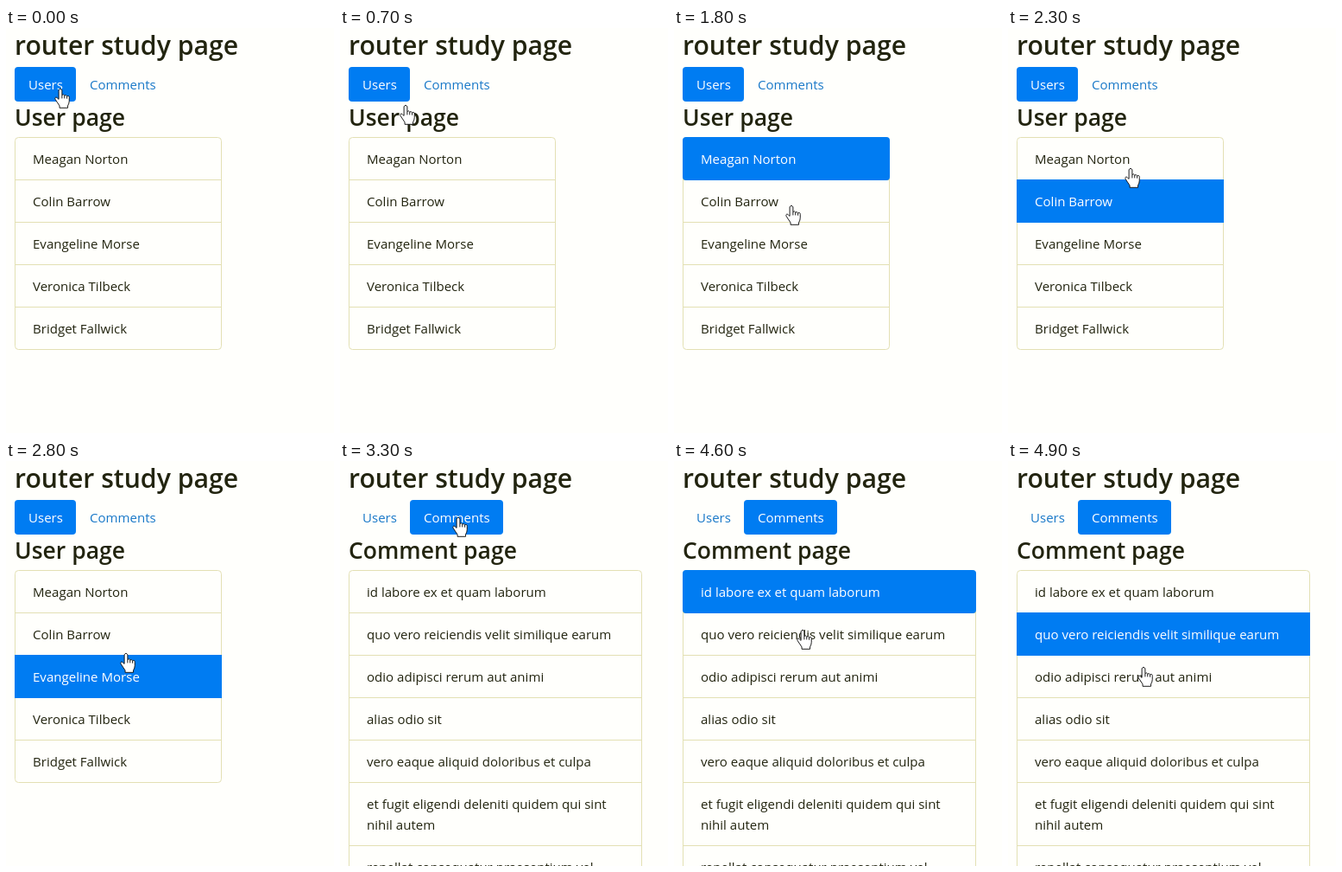
Write an HTML page that moves like this. It is 380 px wide and 468 px high and loops after 5 s.

```html
<!DOCTYPE html>
<html lang="en">
<head>
<meta charset="utf-8">
<title>router study page</title>
<style>
  html, body { margin: 0; width: 100%; height: 100%; overflow: hidden; background: #fffffc; }
  svg { display: block; font: 15.05px "Open Sans", "Noto Sans", sans-serif; fill: #22240f; }
  .title { font-size: 30.2px; font-weight: 600; }
  .sub { font-size: 26.5px; font-weight: 600; }
  .link { fill: #1878c8; }
  .on { fill: #fff; }
  .blue { fill: #007cf2; }
  .line { fill: none; stroke: #e3e0b4; }
  .hand { fill: #fff; stroke: #111; stroke-linejoin: round; }
</style>
</head>
<body>
<svg width="380" height="468" viewBox="0 0 380 468">
  <g id="page"></g>
  <g id="cursor" class="hand">
    <path d="M-2 13V2Q0-1.5 2 2V8Q3.5 6 5 8.5Q6.5 7 8 9.3Q10.8 8 10.8 11V15Q10.8 18 9 21V23.5H-1V21L-6 13.5C-7.5 11-5 9.5-3.6 11.8Z"/>
    <path fill="none" d="M2 8v4M5 8.5v3.5M8 9.3v3"/>
  </g>
</svg>
<script>
const LOOP = 5000, STEP = 100, ROW = 49, LINE = 24;
const pages = [
  { title: "User page", width: 240, items: [
    "Meagan Norton", "Colin Barrow", "Evangeline Morse", "Veronica Tilbeck", "Bridget Fallwick"] },
  { title: "Comment page", width: 340, items: [
    "id labore ex et quam laborum",
    "quo vero reiciendis velit similique earum",
    "odio adipisci rerum aut animi",
    "alias odio sit",
    "vero eaque aliquid doloribus et culpa",
    "et fugit eligendi deleniti quidem qui sint|nihil autem",
    "repellat consequatur praesentium vel|minus molestias voluptatum"] }
];
const tabs = [{ name: "Users", x: 10, w: 71 }, { name: "Comments", x: 81, w: 108 }];

// The hand rests at each stop from `at` until `leave`, then clicks and moves on.
const stops = [
  { at: 0, leave: 400, x: 63, y: 70, click: { page: 0 } },
  { at: 1400, leave: 1500, x: 121, y: 160, click: { page: 0, item: 0 } },
  { at: 1800, leave: 1900, x: 136, y: 205, click: { page: 0, item: 1 } },
  { at: 2300, leave: 2300, x: 142, y: 162 },
  { at: 2700, leave: 2710, x: 139, y: 247, click: { page: 0, item: 2 } },
  { at: 3100, leave: 3300, x: 137, y: 65, click: { page: 1 } },
  { at: 3300, leave: 3700, x: 137, y: 65 },
  { at: 4100, leave: 4400, x: 142, y: 152, click: { page: 1, item: 0 } },
  { at: 4600, leave: 4800, x: 149, y: 195, click: { page: 1, item: 1 } },
  { at: 4900, leave: LOOP, x: 157, y: 238 }
];

const text = (s, x, y, cls = "") => `<text x="${x}" y="${y}" class="${cls}">${s}</text>`;
const box = (x, y, w, h, cls, r = 0) =>
  `<rect x="${x}" y="${y}" width="${w}" height="${h}" rx="${r}" class="${cls}"/>`;

function drawPage({ page, item }) {
  const { title, width, items } = pages[page];
  let out = text("router study page", 10, 31, "title") + text(title, 10, 113, "sub");
  tabs.forEach(({ name, x, w }, i) => {
    if (i === page) out += box(x, 45, w, 40, "blue", 4);
    out += text(name, x + 16, 71, i === page ? "on" : "link");
  });

  let y = 126, active = "", rules = "", labels = "";
  items.forEach((label, i) => {
    const lines = label.split("|"), on = i === item;
    if (i) rules += `<path class="line" d="M10 ${y + .5}h${width}"/>`;
    if (on) active = box(10, y, width, ROW + 1, "blue", i ? 0 : 4);
    lines.forEach((s, n) => labels += text(s, 31, y + 31 + LINE * n, on ? "on" : ""));
    y += ROW + LINE * (lines.length - 1);
  });
  return out + box(10.5, 126.5, width - 1, y - 126, "line", 4) + rules + active + labels;
}

const ease = k => k * k * (3 - 2 * k);

function cursorAt(t) {
  const i = stops.findLastIndex(s => s.at <= t);
  const a = stops[i], b = stops[i + 1] || a;
  const k = t > a.leave ? ease((t - a.leave) / (b.at - a.leave)) : 0;
  return ["x", "y"].map(n => Math.round(a[n] + (b[n] - a[n]) * k));
}

const pageEl = document.getElementById("page");
const cursorEl = document.getElementById("cursor");
let shown;

function render(now) {
  const t = Math.floor(now % LOOP / STEP) * STEP;
  const last = stops.findLast(s => s.click && s.leave <= t) || stops[0];
  if (last !== shown) {
    pageEl.innerHTML = drawPage(last.click);
    shown = last;
  }
  cursorEl.setAttribute("transform", `translate(${cursorAt(t)}) scale(.95)`);
}

const start = performance.now();
function tick() {
  render(performance.now() - start);
  requestAnimationFrame(tick);
}
tick();
</script>
</body>
</html>
```
